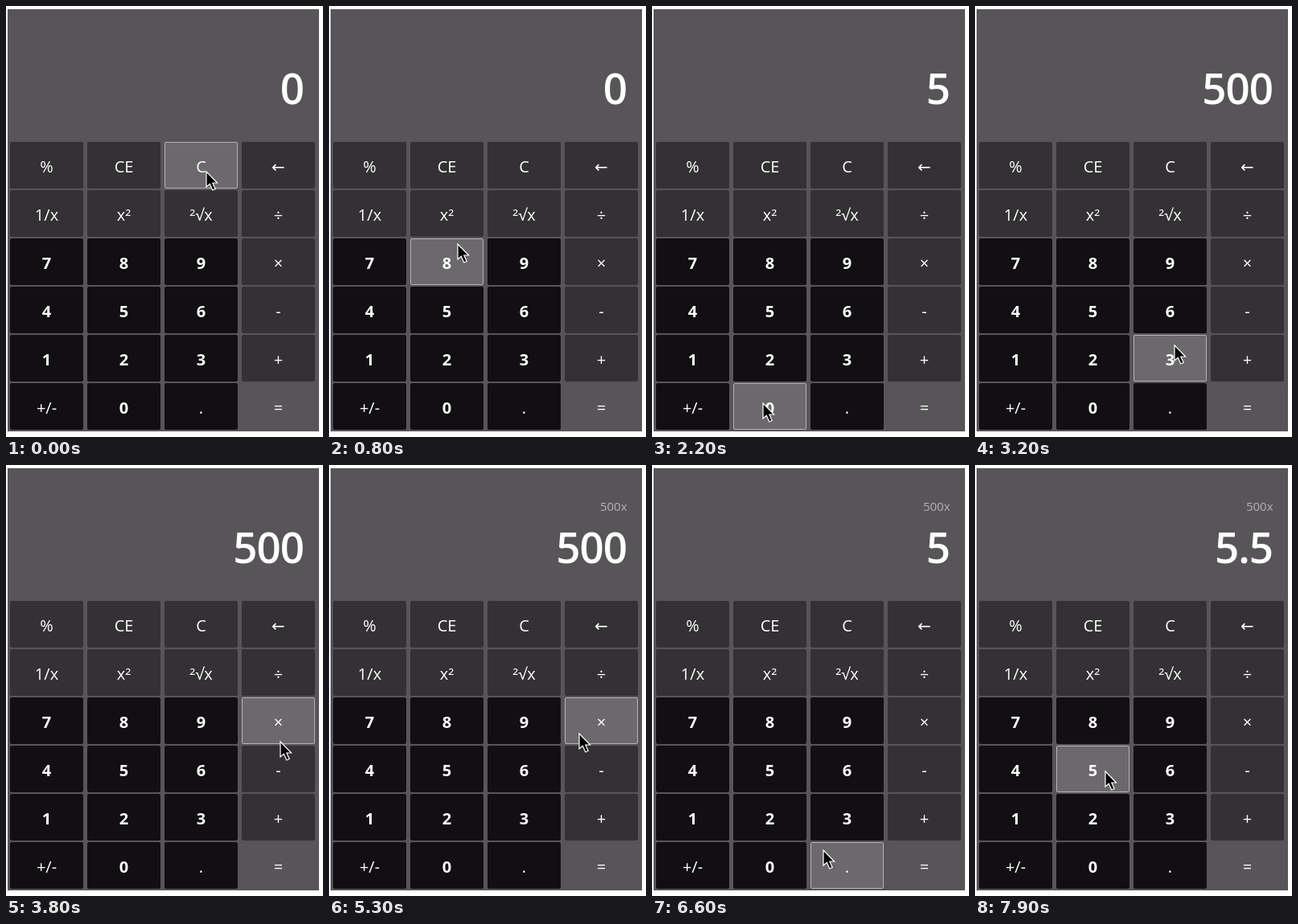
These frames come from a looping animation (394 px wide and 536 px high, 8 s). An HTML page:

```html
<!DOCTYPE html>
<html lang="en">
<head>
<meta charset="utf-8">
<title>Calculator</title>
<style>
  html, body { margin: 0; width: 100%; height: 100%; overflow: hidden; background: #fff; }
  svg { display: block; width: 394px; height: 536px; }
  text { font-family: "Open Sans", "Noto Sans", "DejaVu Sans", sans-serif; fill: #fff; }
  .key { font-size: 20px; text-anchor: middle; }
  .digit { font-weight: 700; }
  #result { font-size: 53px; font-weight: 600; letter-spacing: -1px; text-anchor: end; }
  #pending { font-size: 15px; fill: #b3b1b3; text-anchor: end; }
</style>
</head>
<body>
<svg id="stage" viewBox="0 0 394 536">
  <rect x="2" y="4" width="387" height="525" fill="#575557"/>
  <text id="pending" x="370.5" y="56.5"></text>
  <text id="result" x="370" y="121.5"></text>
  <g id="keys"></g>
  <path id="cursor" d="M0 0V19L4.3 15.2L7.7 23L11.2 21.5L7.8 14H13.6Z" fill="#000" stroke="#fff" stroke-width="1.2"/>
</svg>
<script>
const LOOP = 8000, STEP = 100;
const $ = id => document.getElementById(id);
const labels = ['%', 'CE', 'C', '←', '1/x', 'x²', '²√x', '÷', '7', '8', '9', '×',
  '4', '5', '6', '-', '1', '2', '3', '+', '+/-', '0', '.', '='];

function add(tag, attrs, parent) {
  const el = document.createElementNS('http://www.w3.org/2000/svg', tag);
  for (const name in attrs) el.setAttribute(name, attrs[name]);
  return parent.appendChild(el);
}

const keys = labels.map((label, i) => {
  const x = 5 + i % 4 * 96, y = 169 + Math.floor(i / 4) * 60;
  const dark = i >= 8 && i % 4 < 3;
  const fill = label === '=' ? '#575557' : dark ? '#110f12' : '#333133';
  const box = add('rect', { x: x + .5, y: y + .5, width: 90, height: 57, rx: 1.5 }, $('keys'));
  const isDigit = /^\d$/.test(label);
  add('text', { x: x + 45.5, y: y + 37.5, class: 'key' + (isDigit ? ' digit' : '') }, $('keys')).textContent = label;
  return { x, y, fill, box };
});

// Pointer path: time, x, y
const path = [
  [0, 249, 206], [200, 246, 209], [800, 160, 296], [1100, 152, 376], [1700, 152, 378],
  [2100, 139, 490], [2200, 138, 494], [2800, 139, 496], [3500, 330, 366], [3800, 341, 344],
  [4300, 342, 325], [5200, 342, 325], [5800, 156, 379], [6100, 154, 381], [6300, 155, 382],
  [6600, 213, 479], [6800, 234, 496], [7100, 234, 496], [7600, 162, 381], [LOOP, 162, 381]
];

// Display changes: time, result, pending operation
const display = [
  [0, '0', ''], [1400, '5', ''], [2400, '50', ''], [2600, '500', ''], [5100, '500', '500x'],
  [6200, '5', '500x'], [7000, '5.', '500x'], [7800, '5.5', '500x']
];

function pointer(t) {
  const i = path.findIndex(p => p[0] > t);
  const [t0, x0, y0] = path[i - 1], [t1, x1, y1] = path[i];
  const k = (t - t0) / (t1 - t0);
  return [x0 + (x1 - x0) * k, y0 + (y1 - y0) * k];
}

function draw(now) {
  const t = Math.floor(now % LOOP / STEP) * STEP;
  const [px, py] = pointer(t);
  $('cursor').setAttribute('transform', `translate(${Math.round(px)} ${Math.round(py)})`);
  for (const { x, y, fill, box } of keys) {
    const hover = px >= x && px < x + 91 && py >= y && py < y + 58;
    box.setAttribute('fill', hover ? '#6b696b' : fill);
    box.setAttribute('stroke', hover ? '#b5b3b5' : fill);
  }
  const [, result, pending] = display.filter(d => d[0] <= t).pop();
  $('result').textContent = result;
  $('pending').textContent = pending;
}

const start = performance.now();
function frame() {
  draw(performance.now() - start);
  requestAnimationFrame(frame);
}
frame();
</script>
</body>
</html>
```
